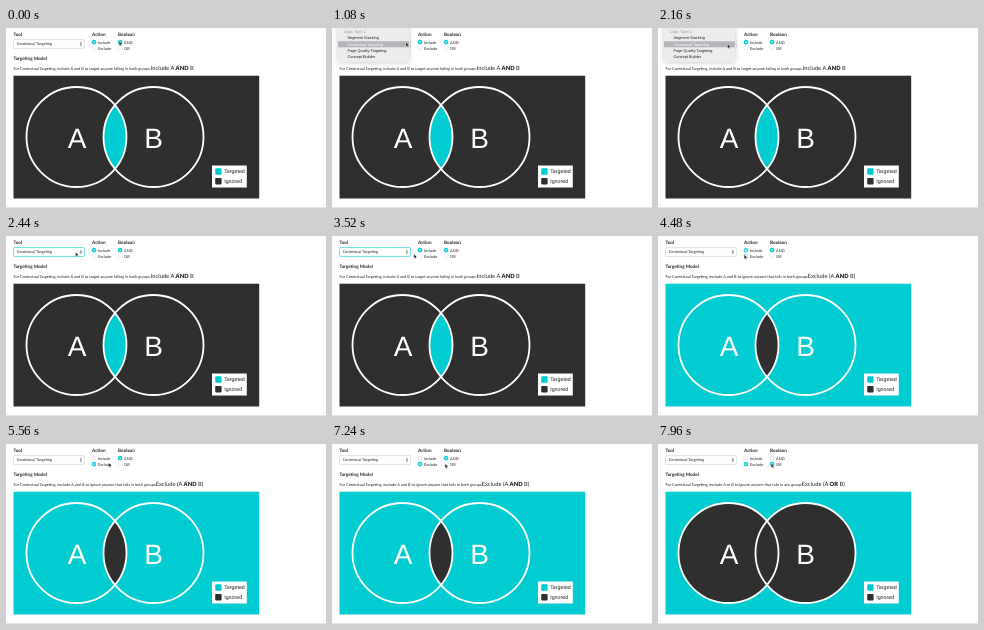
Recreate the animation shown at these times as an HTML page. Size 320x180 px, loop 8000 ms.

```html
<!DOCTYPE html>
<html lang="en">
<head>
<meta charset="utf-8">
<title>Targeting model</title>
<style>
  html, body { margin: 0; height: 100%; overflow: hidden; background: #fff; }
  svg { display: block; width: 100vw; height: 100vh; }
  text { font: 3.9px Lato, sans-serif; fill: #222; text-rendering: geometricPrecision; white-space: pre; }
  .head { font-size: 4.6px; font-weight: 700; }
  #formula { font-size: 5.75px; }
  #formula .op { font-weight: 900; }
  .set { font: 28px "Liberation Sans", Arial, sans-serif; fill: #fff; text-anchor: middle; }
  .key { font: 5.3px "Liberation Sans", Arial, sans-serif; }
  #menu text { font: 3.86px "Liberation Sans", Arial, sans-serif; }
</style>
</head>
<body>
<svg viewBox="0 0 320 180">
  <defs>
    <clipPath id="insideA"><circle cx="70.5" cy="109" r="50"/></clipPath>
    <filter id="shadow" x="-30%" y="-30%" width="160%" height="170%">
      <feDropShadow dx="0" dy="1" stdDeviation="2.5" flood-opacity=".22"/>
    </filter>
  </defs>
  <rect width="320" height="180" fill="#fff"/>
  <path d="M0 179.5H320" stroke="#ddd" stroke-width=".7"/>

  <text class="head" x="7.5" y="8">Tool</text>
  <text class="head" x="86" y="8">Action</text>
  <text class="head" x="112" y="8">Boolean</text>
  <text class="head" x="7.5" y="32">Targeting Model</text>

  <rect id="select" x="7.6" y="11.6" width="70.8" height="8.8" rx=".8" fill="#fff" stroke-width=".6"/>
  <text x="10.7" y="17.4">Contextual Targeting</text>
  <path d="M73.8 15.5l1.1-1.5 1.1 1.5zM73.8 16.4l1.1 1.5 1.1-1.5z" fill="#555"/>
  <g id="radios"></g>

  <text id="sentence" x="7.5" y="41.8"></text>
  <text id="formula" y="42"><tspan id="before"></tspan><tspan id="op" class="op"></tspan><tspan id="after"></tspan></text>

  <rect id="outside" x="7.5" y="47.7" width="245.7" height="122.8"/>
  <circle class="union" cx="70.5" cy="109" r="50"/>
  <circle class="union" cx="147.5" cy="109" r="50"/>
  <circle id="lens" cx="147.5" cy="109" r="50" clip-path="url(#insideA)"/>
  <g fill="none" stroke="#fff" stroke-width="1.8">
    <circle cx="70.5" cy="109" r="50"/>
    <circle cx="147.5" cy="109" r="50"/>
  </g>
  <text class="set" x="71" y="119.5">A</text>
  <text class="set" x="147.7" y="119.5">B</text>

  <rect x="206" y="137.5" width="34.8" height="22" fill="#fff"/>
  <rect x="209.2" y="140.3" width="6.4" height="6.4" rx=".8" fill="#00ccd1"/>
  <rect x="209.2" y="150" width="6.4" height="6.4" rx=".8" fill="#302f30"/>
  <text class="key" x="218.2" y="145.3">Targeted</text>
  <text class="key" x="218.2" y="155">Ignored</text>

  <g id="menu">
    <rect x="6" y="-4" width="71" height="37.5" rx="1.5" fill="#ececec" filter="url(#shadow)"/>
    <rect id="highlight" x="6" y="13.3" width="71" height="6" fill="#b4b5b8"/>
    <text x="12" y="5" style="fill:#999">Logic Type 2</text>
    <text x="15.5" y="11.4">Segment Stacking</text>
    <text id="picked" x="15.5" y="17.6">Contextual Targeting</text>
    <text x="15.5" y="23.8">Page Quality Targeting</text>
    <text x="15.5" y="30">Concept Builder</text>
  </g>

  <path id="cursor" d="M0 0V4.3L1 3.4 1.7 4.9 2.4 4.6 1.7 3.1H3.1Z" fill="#111" stroke="#fff" stroke-width=".35"/>
</svg>
<script>
const LOOP = 8000, STEP = 40;
const CYAN = '#00ccd1', DARK = '#302f30';
const $ = id => document.getElementById(id);
const ramp = (t, from, to) => Math.min(1, Math.max(0, (t - from) / (to - from)));
const mix = (a, b, p) => `rgb(${a.map((v, i) => Math.round(v + (b[i] - v) * p))})`;

const EXCLUDE_AT = 4480, OR_AT = 7280;
const scenes = [
  { at: 0, outside: DARK, union: DARK, lens: CYAN, x: 144.8,
    sentence: 'include A and B to target anyone falling in both groups:',
    formula: ['Include A ', 'AND', ' B'] },
  { at: EXCLUDE_AT, outside: CYAN, union: CYAN, lens: DARK, x: 149.8,
    sentence: 'exclude A and B to ignore anyone that falls in both groups:',
    formula: ['Exclude (A ', 'AND', ' B)'] },
  { at: OR_AT, outside: CYAN, union: DARK, lens: DARK, x: 143.8,
    sentence: 'exclude A or B to ignore anyone that falls in any group:',
    formula: ['Exclude (A ', 'OR', ' B)'] }
];

// Each move: start time, end time, destination of the pointer tip.
const START = [113.2, 13.3];
const moves = [
  [320, 880, 74, 14.3],
  [1600, 1720, 69.6, 16.2],
  [3040, 3920, 86.2, 18.7],
  [5200, 6040, 112.9, 19],
  [6040, 6240, 113.1, 19.8],
  [7760, 7960, 113.3, 19.4]
];

const radios = [
  ['Include', 88, 14.2, t => 1 - ramp(t, EXCLUDE_AT - STEP, 4600)],
  ['Exclude', 88, 20.1, t => ramp(t, EXCLUDE_AT - STEP, 4600)],
  ['AND', 114.1, 14.2, t => 1 - ramp(t, OR_AT - STEP, 7400)],
  ['OR', 114.1, 20.1, t => ramp(t, OR_AT - STEP, 7400)]
].map(([label, x, y, level]) => {
  const g = document.createElementNS('http://www.w3.org/2000/svg', 'g');
  g.innerHTML = `<circle cx="${x}" cy="${y}" r="2.1" stroke-width=".4"/>
    <circle cx="${x}" cy="${y}" r=".8" fill="#fff"/>
    <text x="${x + 4}" y="${y + 1.4}">${label}</text>`;
  $('radios').append(g);
  return { ring: g.firstChild, level };
});

function pointer(t) {
  let [x, y] = START;
  for (const [from, to, toX, toY] of moves) {
    const p = 1 - (1 - ramp(t, from, to)) ** 1.7;
    x += (toX - x) * p;
    y += (toY - y) * p;
  }
  return [x, y];
}

function drawScene(t) {
  const scene = scenes.filter(s => t >= s.at).pop();
  $('outside').setAttribute('fill', scene.outside);
  $('lens').setAttribute('fill', scene.lens);
  document.querySelectorAll('.union').forEach(c => c.setAttribute('fill', scene.union));
  $('sentence').textContent = 'For Contextual Targeting, ' + scene.sentence;
  $('formula').setAttribute('x', scene.x);
  ['before', 'op', 'after'].forEach((id, i) => $(id).textContent = scene.formula[i]);
}

function drawControls(t) {
  const focus = ramp(t, 2240, 2440) * (1 - ramp(t, 4320, 4440));
  $('select').setAttribute('stroke', mix([204, 204, 204], [0, 204, 209], focus));
  for (const { ring, level } of radios) {
    const p = level(t);
    ring.setAttribute('fill', mix([255, 255, 255], [0, 204, 209], p));
    ring.setAttribute('stroke', mix([205, 205, 205], [0, 190, 196], p));
  }
  const blink = t >= 2080 && t < 2160;
  $('menu').setAttribute('opacity', t < 1080 ? 0 : 1 - ramp(t, 2160, 2400));
  $('highlight').setAttribute('opacity', blink ? 0 : 1);
  $('picked').style.fill = blink ? '#222' : '#fff';
  $('cursor').setAttribute('transform', `translate(${pointer(t)})`);
}

function frame() {
  const t = Math.floor(performance.now() % LOOP / STEP) * STEP;
  drawScene(t);
  drawControls(t);
  requestAnimationFrame(frame);
}
frame();
</script>
</body>
</html>
```
